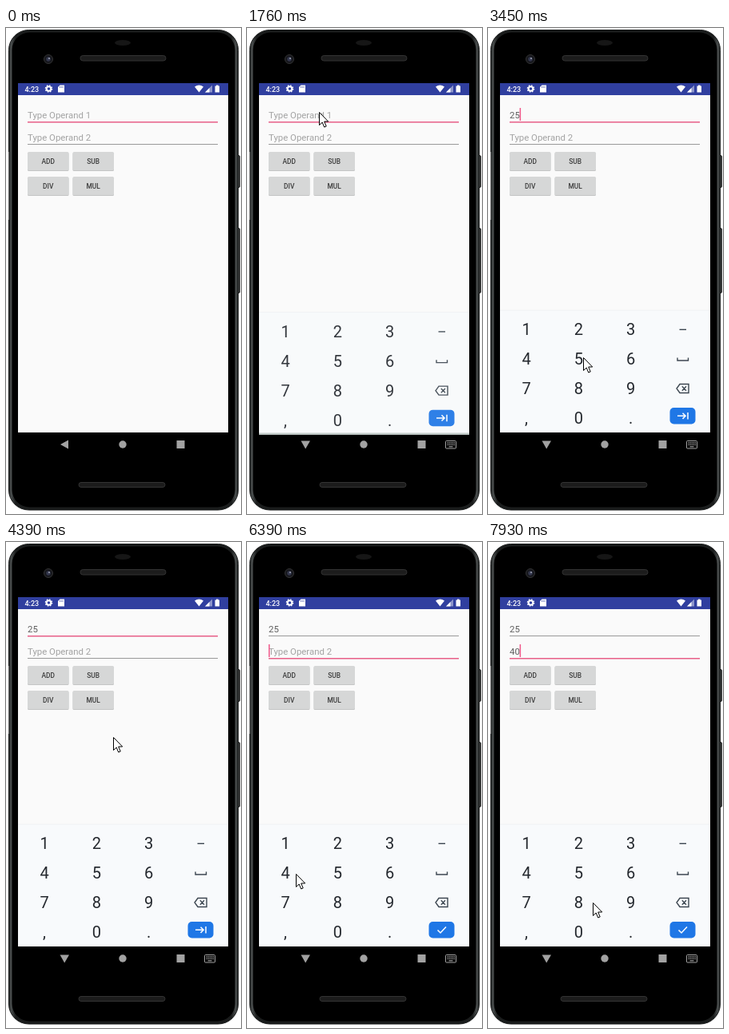
Write an HTML page that moves like this. It is 294x608 px and loops after 8 s.

```html
<!DOCTYPE html>
<html lang="en">
<head>
<meta charset="utf-8">
<title>Calculator input</title>
<style>
  html, body { margin: 0; width: 100%; height: 100%; overflow: hidden; background: #fff; }
  svg { display: block; width: 294px; height: 608px; font-family: Roboto, sans-serif; }
  .field { font-size: 11.4px; }
  .label { font-size: 8.4px; font-weight: 500; fill: #3c3c3c; text-anchor: middle; }
  .digit { font-size: 20px; fill: #24282e; text-anchor: middle; }
  .icon { fill: none; stroke: #3c4650; stroke-width: 1.4; }
  .white { fill: none; stroke: #fff; stroke-width: 1.5; }
</style>
</head>
<body>
<svg viewBox="0 0 294 608">
  <defs>
    <clipPath id="screen"><rect x="15" y="69" width="263" height="468"/></clipPath>
    <linearGradient id="edge">
      <stop offset="0" stop-color="#202323"/><stop offset=".01" stop-color="#4a4e4e"/>
      <stop offset=".03" stop-color="#1a1c1c"/><stop offset=".97" stop-color="#1a1c1c"/>
      <stop offset=".99" stop-color="#4a4e4e"/><stop offset="1" stop-color="#202323"/>
    </linearGradient>
  </defs>

  <!-- Phone body -->
  <g stroke="#222" fill="#4a4d4d">
    <rect x="287.5" y="159.5" width="5" height="40" rx="1.5"/>
    <rect x="287.5" y="250.5" width="5" height="81" rx="1.5"/>
  </g>
  <rect x="3.5" y="2.5" width="287" height="600.5" rx="25" fill="url(#edge)" stroke="#151717"/>
  <rect x="7.5" y="5.5" width="279" height="594" rx="22" fill="#000"/>
  <path d="M3.5 155V240" stroke="#666"/>
  <ellipse cx="146" cy="18.5" rx="10" ry="3.5" fill="#161616"/>
  <g fill="#1c1c1c" stroke="#333">
    <rect x="93" y="34.5" width="107" height="6.5" rx="3.2"/>
    <rect x="91" y="568.5" width="108" height="6" rx="3"/>
    <circle cx="53" cy="39" r="5.5" fill="#16171c"/>
  </g>
  <circle cx="53" cy="39" r="2.7" fill="#34384e"/>
  <circle cx="54" cy="38" r="1" fill="#a0a4b4"/>

  <!-- App -->
  <rect x="15" y="69" width="263" height="437" fill="#fafafa"/>
  <rect x="15" y="69" width="263" height="15" fill="#303f9f"/>
  <g fill="#fff">
    <text x="23.5" y="80" font-size="9" font-weight="500">4:23</text>
    <circle cx="53.5" cy="76" r="2.8" fill="none" stroke="#fff" stroke-width="2"/>
    <circle cx="53.5" cy="76" r="4.1" fill="none" stroke="#fff" stroke-width="1.4" stroke-dasharray="1.6 1.62"/>
    <path d="M67.5 71.5H73V80.5H65V74Z"/>
    <path d="M67.5 73.2v1.5M69.3 73.2v1.5M71.1 73.2v1.5" stroke="#303f9f" stroke-width=".8"/>
    <path d="M236 73.5Q241.5 69.5 247 73.5L241.5 80.5Z"/>
    <path d="M249 80.5L258 71.5V80.5Z" opacity=".45"/>
    <path d="M249 80.5L254.5 75V80.5Z"/>
    <path d="M261.5 72.5H263V71.5H265.5V72.5H267V80.5H261.5Z"/>
  </g>
  <g id="fields"></g>
  <g id="buttons"></g>

  <!-- Navigation bar -->
  <g fill="#a2a2a2">
    <path id="back"/>
    <circle cx="146" cy="521" r="4.7"/>
    <rect x="213.5" y="516" width="10" height="10"/>
    <g id="switcher">
      <rect x="248.5" y="516.5" width="13" height="9.5" rx="1" fill="none" stroke="#a2a2a2"/>
      <path d="M250.5 519H260M250.5 521.3H260" stroke="#a2a2a2" stroke-width="1.3" stroke-dasharray="1.3 .75"/>
      <path d="M252.5 523.8H257.5" stroke="#a2a2a2" stroke-width="1.2"/>
    </g>
  </g>

  <!-- Keypad -->
  <g clip-path="url(#screen)">
    <g id="keypad">
      <rect x="15" y="353" width="263" height="153" fill="#f8fafc"/>
      <path d="M15 353H278" stroke="#f0f2f3"/>
      <path id="rim" d="M15 505H278" stroke="#d3dfdb" stroke-width="2"/>
      <rect id="pressed" width="65" height="37" fill="#e1e3e3"/>
      <g id="digits"></g>
      <path class="icon" d="M239.5 377.3H248"/>
      <path class="icon" d="M237 412.5V416H250.5V412.5"/>
      <path class="icon" d="M240 445.5H251V456.5H240L236 451ZM242.8 448.3L248 453.7M248 448.3L242.8 453.7"/>
      <rect x="227.5" y="475" width="32" height="20.5" rx="5" fill="#1f77e6"/>
      <path class="white" d="M237 485.3H247M243.5 481.7L247.1 485.3L243.5 488.9M250 481V489.6" id="next"/>
      <path class="white" d="M238.5 485.5L242 489L249 481.5" id="done"/>
    </g>
  </g>

  <path id="pointer" d="M.5 .5V16.5L4.2 13L6.7 19L9.2 18L6.7 12H11.7Z" fill="#fff" stroke="#000"/>
</svg>

<script>
const $ = id => document.getElementById(id);
const LOOP = 8000;

$('fields').innerHTML = [0, 1].map(i => `
  <text class="field" id="text${i}" x="27" y="${113 + 28 * i}"></text>
  <rect id="line${i}" x="27" width="238"/>`).join('') +
  '<rect id="caret" width="1.5" height="16" fill="#f0588a"/>';

$('buttons').innerHTML = ['ADD', 'SUB', 'DIV', 'MUL'].map((name, i) => {
  const x = 27 + 56.5 * (i % 2), y = 155 + 31 * (i >> 1);
  return `<rect x="${x}" y="${y + 1}" width="51.5" height="23" rx="1.5" fill="#c4c5c5"/>
    <rect x="${x}" y="${y}" width="51.5" height="23" rx="1.5" fill="#d6d7d7"/>
    <text class="label" x="${x + 25.7}" y="${y + 14.7}">${name}</text>`;
}).join('');

const column = i => 48 + 65.3 * i;
$('digits').innerHTML = ['123', '456', '789', ',0.'].map((row, r) =>
  [...row].map((key, c) =>
    `<text class="digit" x="${column(c)}" y="${384 + 37 * r}">${key}</text>`).join('')).join('');

// Pointer stops: time, x, y
const stops = [
  [530, 236, 598], [1220, 90, 102], [1390, 90, 102], [1500, 90, 93], [1690, 90, 105],
  [2070, 90, 105], [2700, 113, 377], [2930, 113, 377], [3230, 119, 412], [4080, 119, 412],
  [4620, 144, 138], [5370, 144, 138], [6230, 61, 415], [6680, 61, 415], [7000, 111, 487],
  [7080, 111, 487], [7240, 119, 488], [7780, 119, 488], [7930, 131, 451]
];

// Key presses: down, typed, up, column, row, field, digit
const presses = [
  [2760, 2780, 2925, 1, 0, 0, '2'],
  [3300, 3430, 3445, 1, 1, 0, '5'],
  [6540, 6600, 6690, 0, 1, 1, '4'],
  [7390, 7510, 7550, 1, 3, 1, '0']
];
const FOCUS_SECOND = 4920, KEYPAD_IN = 1390, KEYPAD_SET = 1840;
const caretResets = [-790, FOCUS_SECOND, ...presses.map(p => p[1])];

const show = (id, on) => { $(id).style.display = on ? '' : 'none'; };
const set = (id, attrs) => { for (const k in attrs) $(id).setAttribute(k, attrs[k]); };

function pointerAt(t) {
  const i = stops.findIndex(s => s[0] > t);
  if (i < 0) return stops[stops.length - 1].slice(1);
  const [t0, x0, y0] = stops[i - 1], [t1, x1, y1] = stops[i];
  const u = (t - t0) / (t1 - t0), e = u * u * (3 - 2 * u);
  return [x0 + (x1 - x0) * e, y0 + (y1 - y0) * e];
}

function draw(t) {
  const active = t < FOCUS_SECOND ? 0 : 1;
  const values = ['', ''];
  for (const p of presses) if (t >= p[1]) values[p[5]] += p[6];

  values.forEach((value, i) => {
    const focused = i === active;
    $('text' + i).textContent = value || 'Type Operand ' + (i + 1);
    set('text' + i, { fill: value ? '#606060' : '#a3a3a3' });
    set('line' + i, {
      y: 117 + 28 * i,
      height: focused ? 1.5 : 1,
      fill: focused ? '#e85f88' : '#9a9a9a'
    });
  });

  const reset = Math.max(...caretResets.filter(r => r <= t));
  show('caret', (t - reset) % 1000 < 500);
  set('caret', { x: 27 + 6.3 * values[active].length, y: 100 + 28 * active });

  const open = t >= KEYPAD_IN;
  const u = Math.min(1, Math.max(0, (t - KEYPAD_IN) / (KEYPAD_SET - KEYPAD_IN)));
  show('keypad', open);
  show('switcher', open);
  show('rim', u < 1);
  set('keypad', {
    transform: `translate(0 ${30 * (1 - u) ** 1.4})`,
    opacity: u ** .4
  });
  set('back', { d: open ? 'M67.5 516.5H79L73.2 526.5Z' : 'M78 515.5V526.5L68 521Z' });
  show('next', !active);
  show('done', active);

  const press = presses.find(p => t >= p[0] && t < p[2]);
  show('pressed', press);
  if (press) set('pressed', { x: 15.5 + 65.3 * press[3], y: 358 + 37 * press[4] });

  const visible = t >= stops[0][0];
  show('pointer', visible);
  if (visible) set('pointer', { transform: `translate(${pointerAt(t).map(Math.round)})` });
}

function tick() {
  draw(performance.now() % LOOP);
  requestAnimationFrame(tick);
}
tick();
</script>
</body>
</html>
```
